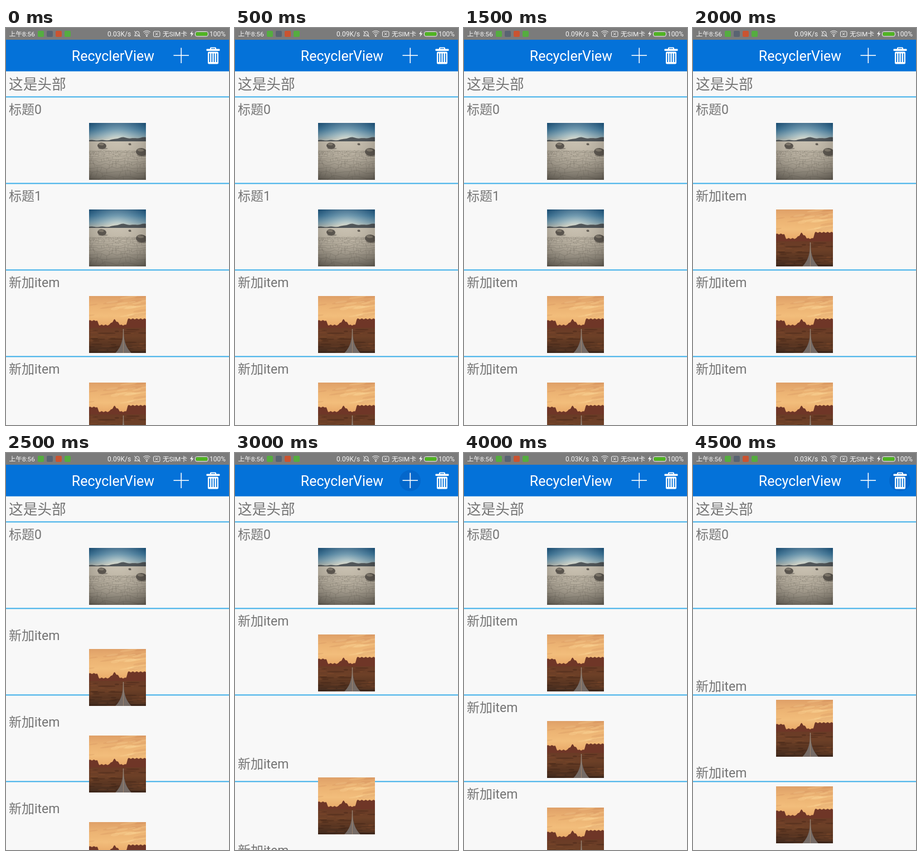
Animation, 400 px wide and 711 px high, one loop 5000 ms. Source, as an HTML page with a canvas:

```html
<!DOCTYPE html>
<html lang="zh-CN">
<head>
<meta charset="utf-8">
<title>RecyclerView</title>
<style>
html, body { margin: 0; width: 100%; height: 100%; overflow: hidden; background: #f8f8f8; }
canvas { display: block; width: 400px; height: 711px; }
</style>
</head>
<body>
<canvas id="stage" width="400" height="711"></canvas>
<script>
const ctx = document.getElementById('stage').getContext('2d');
const FONT = 'Roboto, "Noto Sans CJK SC", "Noto Sans CJK", sans-serif';
const LOOP = 5000, STEP = 500;
const TOP = 124, ROW = 155, PHOTO = 102;
const MOVE = 250, FADE = 120;
const BLUE = '#0472d9', WHITE = '#f4f4f4', GRAY = '#747474';
const NEW = '新加item';
const taps = { 795: 'add', 1560: 'remove', 2197: 'remove', 2850: 'add', 4298: 'remove' };

const clamp = v => Math.max(0, Math.min(1, v));
const ease = v => 0.5 - Math.cos(Math.PI * clamp(v)) / 2;

function seeded(seed) {
  return () => (seed = seed * 16807 % 2147483647) / 2147483647;
}

function text(s, x, y, size, color) {
  ctx.font = `${size}px ${FONT}`;
  ctx.fillStyle = color;
  ctx.fillText(s, x, y);
}

function rect(c, color, x, y, w, h) {
  c.fillStyle = color;
  c.fillRect(x, y, w, h);
}

function round(color, x, y, w, h, r) {
  ctx.fillStyle = color;
  ctx.beginPath();
  ctx.roundRect(x, y, w, h, r);
  ctx.fill();
}

function blob(c, color, x, y, rx, ry = rx, turn = 0) {
  c.fillStyle = color;
  c.beginPath();
  c.ellipse(x, y, rx, ry, turn, 0, 7);
  c.fill();
}

function fade(c, y, h, colors) {
  const g = c.createLinearGradient(0, y, 0, y + h);
  colors.forEach((col, i) => g.addColorStop(i / (colors.length - 1), col));
  rect(c, g, 0, y, PHOTO, h);
}

function glow(c, y, inner, outer) {
  const g = c.createRadialGradient(51, y, 10, 51, y, 72);
  g.addColorStop(0, inner);
  g.addColorStop(1, outer);
  rect(c, g, 0, 0, PHOTO, PHOTO);
}

// Fills from a skyline down to a base line
function ridge(c, color, base, height) {
  c.fillStyle = color;
  c.beginPath();
  c.moveTo(0, base);
  for (let x = 0; x <= PHOTO; x++) c.lineTo(x, base - height(x));
  c.lineTo(PHOTO, base);
  c.fill();
}

function photo(paint) {
  const cv = document.createElement('canvas');
  cv.width = cv.height = PHOTO;
  paint(cv.getContext('2d'), seeded(7));
  return cv;
}

function rock(c, x, y, r) {
  blob(c, 'rgba(50,46,40,.4)', x + r / 4, y + r * 0.6, r * 1.1, r / 5);
  blob(c, '#47423c', x, y, r, r * 0.7, 0.1);
  blob(c, '#746c60', x - r / 6, y - r / 3, r * 0.6, r / 4, 0.1);
}

const playa = photo((c, rnd) => {
  fade(c, 0, 34, ['#12639f', '#2f86bd', '#82b7d0', '#e3d6bb']);
  glow(c, 34, 'rgba(255,240,215,.45)', 'rgba(0,60,110,.2)');
  ridge(c, '#3c4349', 34, x => 3 + 5 * Math.exp(-(((x - 60) / 15) ** 2)) +
    5 * clamp((x - 65) / 30) + Math.sin(x / 3) * 0.5);
  fade(c, 33, 69, ['#c6beae', '#b5ac9c', '#958d7f', '#676157']);
  // Dried mud: rows of cells that grow towards the viewer
  c.strokeStyle = 'rgba(60,55,46,.3)';
  c.lineWidth = 0.8;
  for (let y = 50, h = 2; y < PHOTO; y += h, h *= 1.18) {
    c.beginPath();
    for (let x = -h * rnd(); x < PHOTO + h; x += h * (0.8 + rnd() * 0.7)) {
      const edge = y + (rnd() - 0.5) * h * 0.7;
      c.lineTo(x, edge);
      if (rnd() < 0.6) {
        c.lineTo(x + (rnd() - 0.5) * h, edge + h);
        c.moveTo(x, edge);
      }
    }
    c.stroke();
  }
  rock(c, 23, 41, 8);
  rock(c, 94, 52, 10);
  rock(c, 73, 38, 2.5);
  glow(c, 55, 'rgba(255,250,235,.1)', 'rgba(35,32,28,.3)');
});

const bump = (x, mid, half, h) => h * clamp((half - Math.abs(x - mid)) / 3 + 0.5);

const valley = photo((c, rnd) => {
  fade(c, 0, 54, ['#dfa068', '#ecb373', '#f2bd7b', '#e9a968']);
  for (let i = 0; i < 26; i++) {
    const col = i % 3 ? 'rgba(255,221,160,.24)' : 'rgba(200,128,85,.2)';
    blob(c, col, rnd() * PHOTO, rnd() * 38, 6 + rnd() * 14, 1 + rnd() * 2, -0.15);
  }
  ridge(c, '#6f3627', 62, x => 10 + bump(x, 7, 9, 8) + bump(x, 46, 8, 5) + bump(x, 46, 2, 6) +
    bump(x, 86, 18, 11) + Math.sin(x * 0.9) * 0.8);
  fade(c, 57, 45, ['#6a3b26', '#6d4027', '#593521', '#3f291d']);
  for (let i = 0; i < 45; i++) {
    const y = 58 + rnd() * 44;
    const col = i % 2 ? 'rgba(50,27,18,.3)' : 'rgba(150,88,48,.22)';
    blob(c, col, rnd() * PHOTO, y, 4 + rnd() * 12, 0.6 + rnd());
  }
  for (let y = 59; y < PHOTO; y++) {
    const half = 0.8 + 14 * ((y - 59) / 43) ** 3;
    rect(c, '#756b66', 61.5 - half, y, half * 2, 1);
    rect(c, '#a98c73', 61.2, y, 0.8, 1);
  }
});

function drawRow(label, y, alpha = 1) {
  if (alpha <= 0 || y > 711) return;
  ctx.globalAlpha = alpha;
  text(label, 5, y + 30, 23, GRAY);
  ctx.drawImage(label === NEW ? valley : playa, 149, y + 46);
  ctx.globalAlpha = 1;
}

// Replays all taps up to t; only the latest one can still be moving
function listAt(t) {
  const rows = ['标题0', '标题1', ...Array(6).fill(NEW)];
  let kind = '', age = LOOP, gone = '';
  for (const at in taps) {
    if (at > t) break;
    kind = taps[at];
    age = t - at;
    if (kind === 'add') rows.splice(2, 0, NEW);
    else gone = rows.splice(1, 1)[0];
  }
  return { rows, kind, age, gone };
}

function drawList({ rows, kind, age, gone }) {
  const adding = kind === 'add';
  const left = ROW * (1 - ease((adding ? age : age - FADE) / MOVE));
  const firstMoved = adding ? 3 : 1;
  for (let y = 122.4; y < 711; y += ROW) rect(ctx, '#3daee9', 0, y, 400, 2);
  rows.forEach((label, i) => {
    const shift = i < firstMoved ? 0 : adding ? -left : left;
    const alpha = adding && i === 2 ? clamp((age - MOVE) / FADE) : 1;
    drawRow(label, TOP + i * ROW + Math.round(shift), alpha);
  });
  if (gone && !adding) drawRow(gone, TOP + ROW, clamp(1 - age / FADE));
}

function arc(x, y, r, from, to) {
  ctx.beginPath();
  ctx.arc(x, y, r, from, to);
  ctx.stroke();
}

function box(x, y, w, h, r) {
  ctx.beginPath();
  ctx.roundRect(x, y, w, h, r);
  ctx.stroke();
}

function drawStatus(t) {
  rect(ctx, '#7b7b7b', 0, 0, 400, 21);
  text('上午8:56', 5.5, 15, 11.8, WHITE);
  ['#55ad40', '#596472', '#ca5431', '#55ad40'].forEach((col, i) => round(col, 57 + i * 16, 5, 11, 11, 2));
  text(t >= 500 && t < 3500 ? '0.09K/s' : '0.03K/s', 182, 15, 12, WHITE);
  text('无SIM卡', 281, 15, 11.8, WHITE);
  text('100%', 365, 15, 12, WHITE);

  ctx.strokeStyle = WHITE;
  ctx.lineWidth = 1;
  // Muted bell, Wi-Fi, missing SIM
  ctx.stroke(new Path2D('M230 14H240M232 14V9.5a3.5 3.5 0 0 1 7 0V14M230 5.5l11 10.5'));
  for (let r = 4; r <= 10; r += 3) arc(252.5, 15, r, -Math.PI * 0.72, -Math.PI * 0.28);
  blob(ctx, WHITE, 252.5, 14.3, 1.3);
  box(264.5, 6, 11.5, 9.5, 2);
  ctx.stroke(new Path2D('M268 8.5l4.5 4.5m0 -4.5l-4.5 4.5'));
  // Charging bolt and battery
  ctx.fill(new Path2D('M334.5 5l-4.5 6h3l-1.5 5l5 -6.5h-3z'));
  box(339.5, 6.5, 23, 8.5, 3);
  round('#50b522', 340.5, 7.5, 21, 6.5, 2);
}

function drawBar({ kind, age }) {
  rect(ctx, BLUE, 0, 21, 400, 56.6);
  text('RecyclerView', 117.8, 59, 25, '#fff');
  if (age < MOVE) blob(ctx, 'rgba(0,40,120,.14)', kind === 'add' ? 314 : 371, 49.5, 19);
  rect(ctx, '#fff', 300.5, 48.3, 27.5, 1.6);
  rect(ctx, '#fff', 313.5, 35.5, 1.6, 27.5);
  // Trash can
  round('#fff', 366, 34.5, 11, 5, 1.5);
  rect(ctx, BLUE, 368, 36.2, 7, 1.6);
  round('#fff', 359.5, 37.5, 24, 3.5, 1);
  round('#fff', 362, 42.5, 19, 22, 2);
  for (let i = 0; i < 4; i++) rect(ctx, BLUE, 364.3 + i * 4.2, 45.5, 1.8, 15.5);
}

function draw(t) {
  const list = listAt(t);
  rect(ctx, '#f8f8f8', 0, 0, 400, 711);
  text('这是头部', 5, 110, 25.7, GRAY);
  drawList(list);
  drawStatus(t);
  drawBar(list);
}

const start = performance.now();
function tick() {
  const t = (performance.now() - start) % LOOP;
  draw(Math.floor(t / STEP) * STEP);
  requestAnimationFrame(tick);
}
tick();
</script>
</body>
</html>
```
